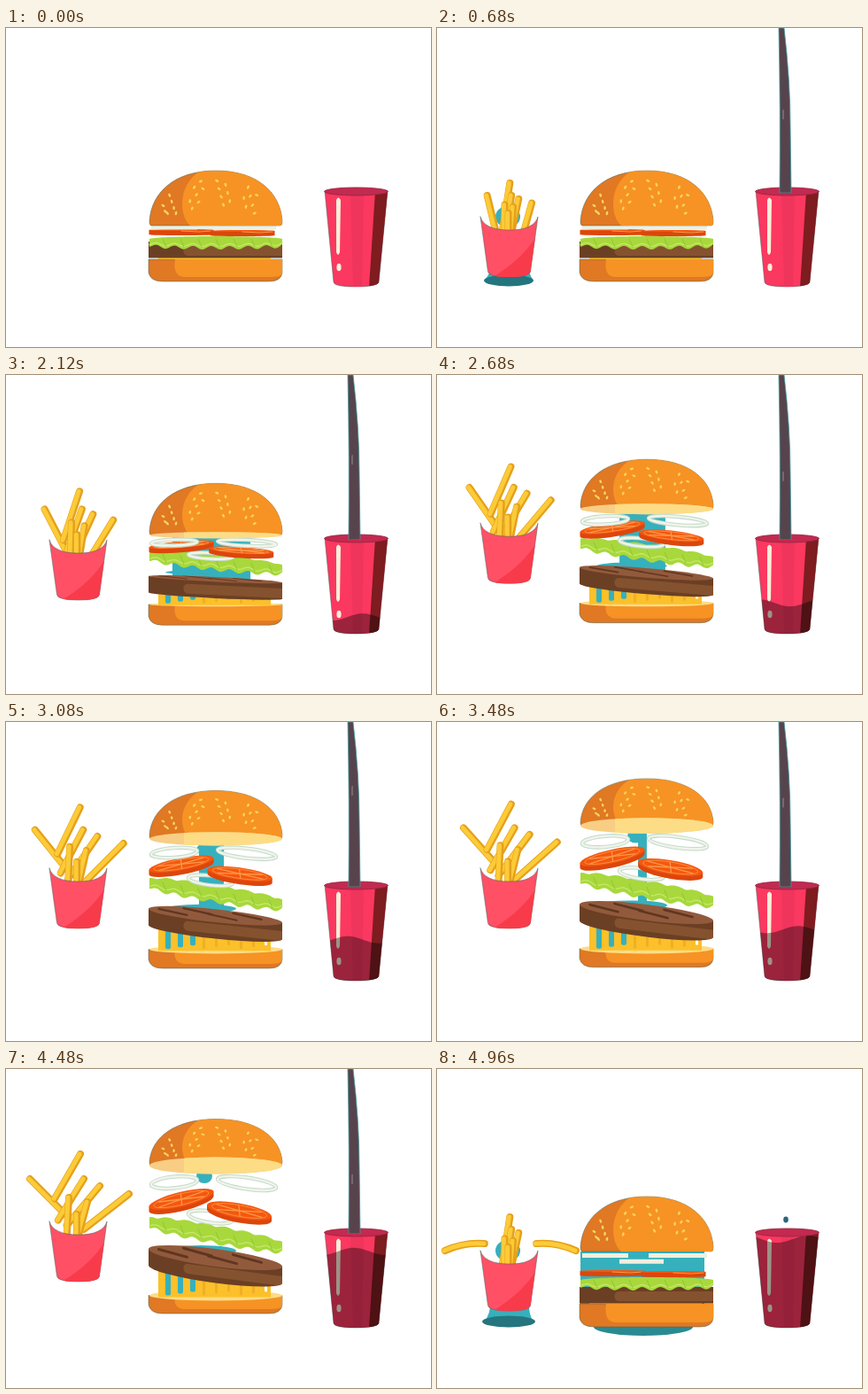
These frames come from a looping animation (480x360 px, 5 s). An HTML page with a canvas:

```html
<!DOCTYPE html>
<html lang="en">
<head>
<meta charset="utf-8">
<title>Burger, fries and drink</title>
<style>
html, body { margin: 0; width: 100%; height: 100%; overflow: hidden; background: #fff; }
canvas { display: block; }
</style>
</head>
<body>
<canvas id="stage" width="480" height="360"></canvas>
<script>
const ctx = document.getElementById('stage').getContext('2d');
const LOOP = 5000, STEP = 40;
const TEAL = '#36b0bd', DEEP_TEAL = '#25757e', EDGE = 'rgba(60,95,85,.6)';

const rad = deg => deg * Math.PI / 180;
const clamp = n => Math.max(0, Math.min(1, n));
const mix = (a, b, p) => a + (b - a) * p;
const span = (t, from, to) => clamp((t - from) / (to - from));
const smooth = (t, from, to) => { const p = span(t, from, to); return p * p * (3 - 2 * p); };
const slam = t => span(t, 4480, 4960) ** 2;

function group(x, y, draw, shear = 0) {
  ctx.save();
  ctx.translate(x, y);
  ctx.transform(1, Math.tan(rad(shear)), 0, 1, 0, 0);
  draw();
  ctx.restore();
}

function fill(path, color, outline) {
  const shape = typeof path === 'string' ? new Path2D(path) : path;
  ctx.fillStyle = color;
  ctx.fill(shape);
  if (outline) {
    ctx.strokeStyle = outline;
    ctx.lineWidth = .8;
    ctx.stroke(shape);
  }
  return shape;
}

function ellipse(x, y, rx, ry, color, deg = 0, outline) {
  const shape = new Path2D();
  shape.ellipse(x, y, rx, ry, rad(deg), 0, 7);
  return fill(shape, color, outline);
}

function bar(x, y, w, h, r, color) {
  const shape = new Path2D();
  shape.roundRect(x, y, w, h, r);
  fill(shape, color);
}

function line(color, width, ...points) {
  ctx.strokeStyle = color;
  ctx.lineWidth = width;
  ctx.lineCap = 'round';
  ctx.beginPath();
  points.forEach(([x, y]) => ctx.lineTo(x, y));
  ctx.stroke();
}

function clipped(shape, draw) {
  ctx.save();
  ctx.clip(shape);
  draw();
  ctx.restore();
}

function slabSide(rx, ry, depth, color) {
  const side = new Path2D();
  side.moveTo(-rx, 0);
  side.lineTo(-rx, depth);
  side.ellipse(0, depth, rx, ry, 0, Math.PI, 0, true);
  side.lineTo(rx, 0);
  return fill(side, color);
}

function seeds() {
  for (let i = 1; i <= 28; i++) {
    const x = (i * .7549 % 1 * 2 - 1) * 62;
    const crown = 62 * (1 - Math.sqrt(1 - (x / 76) ** 2));
    ellipse(x, Math.min(48, crown + 7 + i * .5698 % 1 * 32) - 62, 2.2, 1.3, '#f8d45c', i * 73 % 140 + 20);
  }
}

function topBun(y, under) {
  group(237, y, () => {
    ctx.save();
    ctx.scale(1, (62 - under) / 62);
    const dome = fill('M-73 0Q-75 0-75-5C-73-38-46-62 0-62S73-38 75-5Q75 0 73 0Z', '#e07824', EDGE);
    clipped(dome, () =>
      fill('M-14-64C-30-56-38-40-38-25C-38-13-34-4-29 0H80V-64Z', '#f69324'));
    seeds();
    ctx.restore();
    clipped(ellipse(0, 0, 75, under, '#f8cd84'), () => bar(-36, -12, 112, 24, 0, '#fddc86'));
  });
}

function bottomBun(y, h, ry) {
  group(237, y, () => {
    const bun = fill(`M-76 0H75V${h - 10}Q74 ${h} 60 ${h}H-60Q-74 ${h}-76 ${h - 10}Z`, '#e07824', EDGE);
    clipped(bun, () =>
      fill(`M-46 0Q-49 ${h - 6}-36 ${h - 5}H62Q73 ${h - 5} 76 ${h - 9}V0Z`, '#f69324'));
    ellipse(0, 0, 75, ry, '#fddc86');
  });
}

function cheese(top, end) {
  if (end <= top) return;
  bar(172, top, 127, end - top, 0, '#fbc02a');
  for (let i = 0; i < 9; i++) {
    const color = i < 3 ? TEAL : i > 7 ? '#fff' : '#f2ae25';
    bar(180 + i * 14, top, i < 3 ? 6 : 3, Math.max(0, end - top - 2 - i % 3 * 2), 2, color);
  }
}

function patty(y, open) {
  const ry = 10 * open ** 1.3;
  group(236.5, y, () => {
    const side = slabSide(75.5, ry, 18.5, '#6b3f24');
    clipped(side, () => bar(-36, 5 + ry * .6, 120, 11, 5, '#85522f'));
    clipped(ellipse(0, 0, 75.5, ry, '#925a3c'), () => {
      for (let i = 0; i < 4; i++) {
        const x = i * 28 - 50, mark = (i % 2 ? -.5 : 0) * ry;
        line('#5f3620', ry * .3, [x - 14, mark - 1], [x + 18, mark + ry * .35]);
      }
    });
  }, 7.5 * open);
}

function lettuce(y, open) {
  group(237, y, () => {
    const leaf = new Path2D(), vein = [];
    const taper = x => (1 - (x / 76) ** 2) ** .4;
    for (let x = -75; x <= 75; x += 2)
      leaf.lineTo(x, -3 - taper(x) * (4 + 2.5 * open) - 2.5 * open * Math.abs(Math.sin(x / 7)));
    for (let x = 75; x >= -75; x -= 2) {
      const wave = 2 * Math.sin(x / 3.3);
      leaf.lineTo(x, 3 + taper(x) * (3 + 2.5 * open) + wave);
      vein.push([x, 1 + taper(x) * 2 + wave * .8]);
    }
    leaf.closePath();
    fill(leaf, '#a8d83c');
    line('#c6e868', 1.3, ...vein);
    for (let x = -60; x < 65; x += 20) line('#8fc63a', 1, [x, -4], [x + 4, 5]);
  }, 10.5 * open);
}

function onion(x, y, rx, open, tilt) {
  group(x, y, () => {
    const ry = 1.5 + 5 * open;
    if (ry < 3) return bar(-rx, -2.5, rx * 2, 5, 0, '#efefde');
    const ring = new Path2D();
    ring.ellipse(0, 0, rx, ry, 0, 0, 7);
    ctx.strokeStyle = '#c3dbcd';
    ctx.lineWidth = 4.5;
    ctx.stroke(ring);
    ctx.strokeStyle = '#f1f4e8';
    ctx.lineWidth = 2.4;
    ctx.stroke(ring);
  }, tilt * open);
}

function tomato(x, y, open, tilt) {
  group(x, y, () => {
    const ry = 1 + 7.5 * open;
    slabSide(36.5, ry, 5, '#dc460c');
    ellipse(0, 0, 36.5, ry, '#f5570f');
    if (ry < 2) return line('#fb9a3c', 1.2, [0, 1], [20, 2], [34, 1]);
    ellipse(0, 0, 31, ry * .75, 'transparent', 0, '#fc9a48');
    for (let i = 0; i < 3; i++) {
      const c = Math.cos(.5 + i * 1.05) * 29, s = Math.sin(.5 + i * 1.05) * ry * .7;
      line('#fc9a48', 1.3, [-c, -s], [c, s]);
    }
  }, tilt * open);
}

// Layers part with one lift; lower ones lead, and all but the top close fully on landing.
function burger(t) {
  const drop = slam(t), rise = smooth(t, 800, 4000);
  const lift = rise * (1 - .85 * drop), open = rise * (1 - drop);
  const lead = open ** .6, early = open ** .8, sink = 5 * drop;
  const bunY = 223 - 114 * lift, pattyY = 241 - 28 * open + sink;
  const baseY = 261 - 5.5 * open + sink * .8, baseEnd = 286 - 10 * open + sink;
  const gap = 70 * (1 - open) * clamp(lift * 12);

  ellipse(233, 291, 56, 10 * drop, '#2a8a92');
  bar(232 - gap, bunY, gap * 2, baseY - bunY, 0, TEAL);
  ellipse(224, bunY + 12, 9, 8 * open, TEAL);
  ellipse(220, pattyY - 8, 40, 6 * open, TEAL);
  bottomBun(baseY, baseEnd - baseY, 6 * open);
  cheese(pattyY + 8, baseY + 2 * open);
  patty(pattyY, open);
  lettuce(242 - 54 * lead, lead);
  onion(231, 226 - 59 * lift, 25, open, 8);
  tomato(198, 228 - 81 * early, open, -13);
  tomato(mix(267, 263.5, open), 229 - 69 * early, open, 10);
  onion(190, 225 - 97 * lift, 26, open, -5);
  onion(272, 225 - 96 * lift, 33, open, 8);
  topBun(bunY, 9.5 * open);
}

// Spread pose of each fry: length, tip x, tip height over the box, lean from vertical.
const FRIES = [
  [65, 27, 48, -45], [58, 84, 76, 30], [55, 88, 48, 32], [58, 106, 40, 40],
  [65, 139, 31, 52], [45, 71, 27, 3], [45, 92, 22, 15], [40, 80, 8, 0]
];

function fry([length, tipX, height, tipLean], top, spread, drop) {
  const flying = Math.abs(tipLean) > 40, side = Math.sign(tipLean);
  const s = flying ? spread : spread * (1 - drop), fly = flying ? drop : 0;
  const x = 81 + (tipX - 81) * mix(.45, 1, s) + side * 18 * fly;
  const y = top - height * mix(.5, 1, s) * (1 - fly);
  const lean = mix(tipLean * mix(.3, 1, s), side * 100, fly);
  const reach = length * (1 - .3 * fly);
  const endX = x - Math.sin(rad(lean)) * reach, endY = y + Math.cos(rad(lean)) * reach;
  const stroke = (color, width, shift) => {
    ctx.strokeStyle = color;
    ctx.lineWidth = width;
    ctx.lineCap = 'round';
    ctx.beginPath();
    ctx.moveTo(x + shift, y);
    ctx.quadraticCurveTo((x + endX) / 2 + shift, (y + endY) / 2 - 6 * fly, endX + shift, endY);
    ctx.stroke();
  };
  stroke('#e5a01c', 8, 0);
  stroke('#fccb38', 5, -1);
}

function fries(t) {
  const grow = 1 - (1 - span(t, 200, 620)) ** 2;
  if (!grow) return;
  const drop = slam(t), spread = 1 - (1 - span(t, 1320, 4480)) ** 2;
  const top = 213 - 48 * smooth(t, 1200, 2900) + 7 * smooth(t, 3480, 4480) + 33 * drop;
  ctx.save();
  ctx.translate(81, 278);
  ctx.scale(grow, grow);
  ctx.translate(-81, -278);
  if (top > 200) {
    fill(`M60 ${top + 56}H104Q103 277 109 285H53Q61 277 60 ${top + 56}Z`, TEAL);
    ellipse(81, 285, 28 + 2 * drop, 6.5, DEEP_TEAL);
    ellipse(80, top, 14, 12, TEAL);
  }
  FRIES.forEach(f => fry(f, top, spread, drop));
  group(81.5, top, () => {
    const box = fill('M-32.5 0Q-28 15 0 15T32.5 0L24 62Q23 68 0 68T-24 62Z', '#ff5066', EDGE);
    clipped(box, () => fill('M38 8Q22 45-22 70H38Z', '#f83b4a'));
  });
  ctx.restore();
}

function stream(t) {
  const head = 186 * span(t, 440, 640), tail = 186 * span(t, 4640, 4900);
  if (head > tail) {
    const flow = new Path2D();
    flow.rect(380, tail, 26, head - tail);
    clipped(flow, () => {
      fill('M386 0H392Q399 60 399 110L400 186H387Q388 90 386 0Z', '#57434c', '#3e989e');
      const glint = 70 + t / 30 % 50;
      line('rgba(215,225,225,.6)', .8, [391, glint], [391, glint + 10]);
    });
  }
  if (t >= 4900) ellipse(394, 170 + (t - 4960) / 8, 2.8, 3.4, '#28667c');
}

function cup(t) {
  const body = fill('M360 184L370 287Q371 292 395 292T421 287L431 184Z', '#fb3860', EDGE);
  clipped(body, () => {
    fill('M389 184H404L402 293H392Z', '#ef355c');
    fill('M417 184H432L422 293H410Z', '#7e1c20');
    fill('M373 194Q375 189 378 194L377 253Q375 259 373 253Z', '#fbeed8');
    ellipse(376, 270, 2.6, 4.3, '#fbeed8');
    const level = 296 - 104 * span(t, 1320, 4960), trough = 368 + (t - 2120) * .055;
    const liquid = new Path2D();
    liquid.moveTo(358, 300);
    for (let x = 358; x <= 434; x += 2)
      liquid.lineTo(x, level + 4 * Math.cos((x - trough) * Math.PI / 35));
    liquid.lineTo(434, 300);
    if (t > 1240) fill(liquid, 'rgba(0,0,0,.38)');
  });
  ellipse(395.5, 184.5, 36, 4.5, '#c22a50', 0, '#97243f');
  stream(t);
}

const start = performance.now();

function render() {
  const elapsed = Math.max(0, performance.now() - start);
  const t = Math.floor(elapsed % LOOP / STEP) * STEP;
  ctx.clearRect(0, 0, 480, 360);
  fries(t);
  burger(t);
  cup(t);
  requestAnimationFrame(render);
}
render();
</script>
</body>
</html>
```
